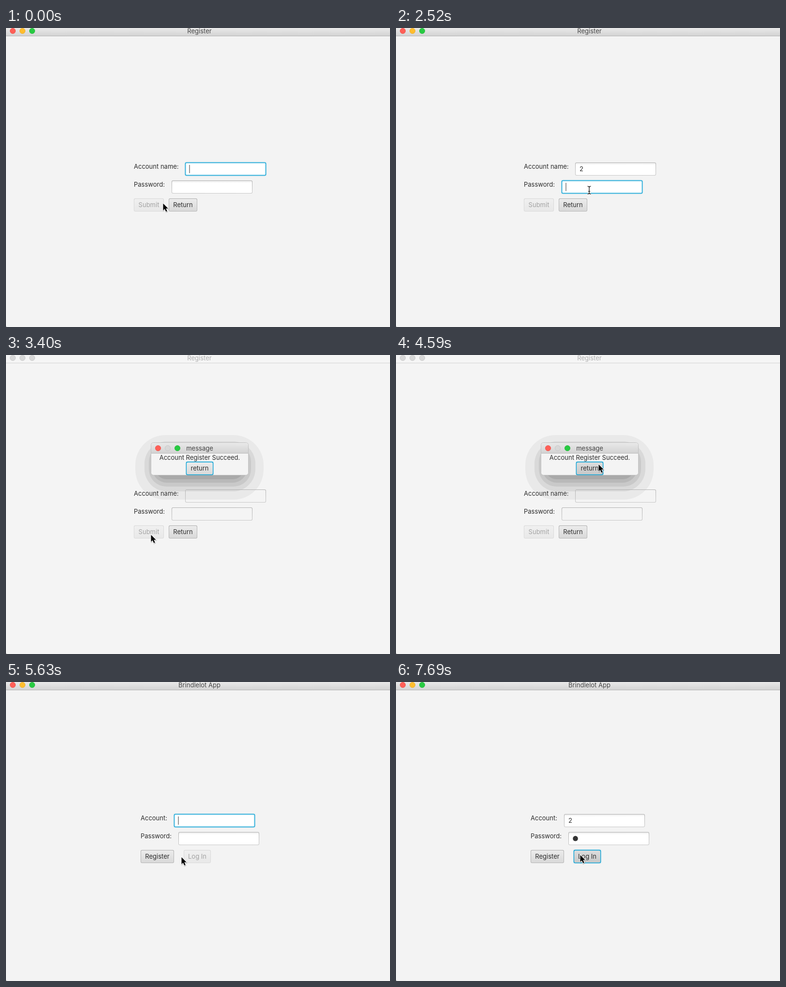
These frames come from a looping animation (793x616 px, 8 s). An HTML page:

```html
<!DOCTYPE html>
<html lang="en">
<head>
<meta charset="utf-8">
<title>Register and log in</title>
<style>
  html, body { margin: 0; height: 100%; overflow: hidden; background: #f3f3f3; }
  svg { display: block; width: 100%; height: 100%; }
  text { font: 13px Inter, sans-serif; white-space: pre; }
  .mid { text-anchor: middle; }
  .shadow { mix-blend-mode: darken; }
</style>
</head>
<body>
<svg viewBox="0 0 793 616">
  <defs>
    <linearGradient id="bar" x2="0" y2="1"><stop stop-color="#e9e9e9"/><stop offset="1" stop-color="#d2d2d2"/></linearGradient>
    <linearGradient id="up" x2="0" y2="1"><stop stop-color="#ebebeb"/><stop offset="1" stop-color="#d9d9d9"/></linearGradient>
    <linearGradient id="hover" x2="0" y2="1"><stop stop-color="#f3f3f3"/><stop offset="1" stop-color="#e2e2e2"/></linearGradient>
    <linearGradient id="down" x2="0" y2="1"><stop stop-color="#dcdcdc"/><stop offset="1" stop-color="#c8c8c8"/></linearGradient>
    <linearGradient id="inset" x2="0" y2="1"><stop stop-color="#ececec"/><stop offset=".18" stop-color="#fff"/></linearGradient>
    <linearGradient id="edge" x2="0" y2="1"><stop stop-color="#b2b2b2"/><stop offset="1" stop-color="#c8c8c8"/></linearGradient>
  </defs>
  <g id="stage"></g>
</svg>
<script>
const LOOP = 8000, BLUE = '#039ed3', FAINT = '#039ed322', INK = '#2c2c2c';
const stage = document.getElementById('stage');

// Each step changes some of the state at its time in ms.
const steps = [
  [0, { scene: 'register', x: 324.5, y: 361.5, beam: false, name: '', pass: false, focus: 'name', dialog: false, hot: '', pressed: false }],
  [440, { x: 372, y: 362, hot: 'back' }],
  [590, { x: 426, y: 352, hot: '' }],
  [740, { x: 420, y: 305 }],
  [890, { x: 414, y: 292, beam: true }],
  [1490, { name: '2' }],
  [1640, { x: 412, y: 300 }],
  [1790, { x: 405, y: 322 }],
  [1930, { x: 400, y: 336 }],
  [2080, { x: 399, y: 338 }],
  [2220, { focus: 'pass' }],
  [2520, { y: 334 }],
  [2660, { pass: true }],
  [2810, { x: 370, y: 352, beam: false, hot: 'back' }],
  [2960, { x: 312, y: 375, hot: 'go' }],
  [3110, { x: 299.5, y: 370.5, focus: 'go', pressed: true }],
  [3250, { dialog: true, name: '', pass: false, focus: 'back', hot: '', pressed: false }],
  [3700, { x: 326, y: 338 }],
  [3850, { x: 398, y: 250 }],
  [4000, { x: 418.5, y: 225.5, hot: 'ok' }],
  [4590, { pressed: true }],
  [4740, { dialog: false, hot: '', pressed: false }],
  [4890, { x: 386, y: 310 }],
  [5040, { x: 362.5, y: 361, hot: 'back' }],
  [5330, { pressed: true }],
  [5480, { scene: 'login', focus: 'name', hot: '', pressed: false }],
  [5780, { x: 367, y: 338 }],
  [5930, { x: 374, y: 305 }],
  [6080, { x: 378, y: 289, beam: true }],
  [6370, { name: '2' }],
  [6520, { x: 376, y: 306 }],
  [6660, { x: 372, y: 328 }],
  [6810, { x: 371, y: 331.5, focus: 'pass' }],
  [6960, { pass: true }],
  [7100, { y: 336 }],
  [7250, { x: 376, y: 346, beam: false }],
  [7400, { x: 380.5, y: 354, hot: 'go' }],
  [7540, { y: 356.5 }],
  [7690, { focus: 'go', pressed: true }],
];

const rect = (x, y, w, h, r, fill, more = '') =>
  `<rect x="${x}" y="${y}" width="${w}" height="${h}" rx="${r}" fill="${fill}" ${more}/>`;
const text = (x, y, s, fill = INK, cls = '') =>
  `<text x="${x}" y="${y}" fill="${fill}" class="${cls}">${s}</text>`;
const light = (x, y, color, edge) =>
  `<circle cx="${x}" cy="${y}" r="5.6" fill="${color}" stroke="${edge}" stroke-width=".8"/>`;
const red = (x, y) => light(x, y, '#ff5f57', '#ee5048');
const green = (x, y) => light(x, y, '#28ca42', '#22b83a');
const grey = (x, y) => light(x, y, '#d8d8d8', '#c6c6c6');

function field(x, y, { value = '', dot = false, focus, flat }) {
  const caret = x + (dot ? 20.5 : value ? 18 : 8.5);
  return (focus
      ? rect(x - .2, y - .2, 167.4, 27.4, 3, BLUE) + rect(x + 1, y + 1, 165, 25, 2, '#fff') +
        rect(x - 1.4, y - 1.4, 169.8, 29.8, 4, FAINT) + rect(x + 3, y + 3, 161, 21, 1, '#fff')
      : rect(x, y, 167, 27, 3, 'url(#edge)') + rect(x + 1, y + 1, 165, 25, 2, flat ? '#f4f4f4' : 'url(#inset)')) +
    (value && text(x + 9, y + 18, value)) +
    (dot ? `<circle cx="${x + 14.5}" cy="${y + 13.4}" r="5.3" fill="#333"/>` : '') +
    (focus ? rect(caret, y + 5, 1, 17, 0, '#333') : '');
}

function button(x, y, w, label, { focus, hot, pressed, disabled }) {
  const face = !hot ? 'up' : pressed ? 'down' : 'hover';
  return `<g opacity="${disabled ? .4 : 1}">` +
    (focus
      ? rect(x - 1.4, y - 1.4, w + 2.8, 29.8, 4, FAINT) + rect(x - .2, y - .2, w + .4, 27.4, 3, BLUE)
      : rect(x, y, w, 27, 3, '#b4b4b4')) +
    rect(x + 1.2, y + 1.2, w - 2.4, 24.6, 2, hot && pressed ? '#e4e4e4' : '#f7f7f7') +
    rect(x + 1.2, y + 2, w - 2.4, 23.8, 2, `url(#${face})`) +
    text(x + w / 2, y + 18, label, INK, 'mid') + '</g>';
}

function windowFrame(title, active) {
  return rect(0, 0, 793, 616, 0, active ? '#f3f3f3' : '#f4f4f4') +
    rect(0, 0, 793, 17, 0, active ? 'url(#bar)' : '#f5f5f5') +
    rect(0, 16, 793, 1, 0, active ? '#b4b4b4' : '#d4d4d4') +
    (active ? red(14, 6) + light(34, 6, '#ffbd2e', '#e9ab28') + green(54, 6)
            : grey(14, 6) + grey(34, 6) + grey(54, 6)) +
    text(399.5, 11, title, active ? '#454545' : '#b0b0b0', 'mid') +
    '<path d="M0 613.5V616H2.5Q.5 615.5 0 613.5" fill="#aaa"/>';
}

function dialog(look) {
  const bands = [
    [267, 165, 265, 133, 62, '#e9e9e9'], [286, 178, 229, 103, 46, '#d9d9d9'],
    [295, 184, 211, 87, 36, '#c9c9c9'], [302, 190, 196, 73, 30, '#b9b9b9'],
    [308, 196, 184, 60, 24, '#a9a9a9'],
  ];
  return `<g class="shadow">${bands.map(b => rect(...b)).join('')}</g>` +
    rect(299.5, 180.5, 201, 67, 5, '#f4f4f4', 'stroke="#c2c2c2"') +
    '<path d="M300 203v-17a5 5 0 0 1 5-5h190a5 5 0 0 1 5 5v17z" fill="url(#bar)"/>' +
    rect(300, 202, 200, 1, 0, '#bcbcbc') +
    red(314, 192) + grey(334, 192) + green(354, 192) +
    text(400, 197, 'message', '#454545', 'mid') +
    text(400, 216, 'Account Register Succeed.', INK, 'mid') +
    button(372, 220, 56, 'return', look);
}

function pointer({ x, y, beam }) {
  const bar = 'M-3.5-8Q-.5-8 0-6Q.5-8 3.5-8M0-6V6M-3.5 8Q-.5 8 0 6Q.5 8 3.5 8M-2 2.5H2';
  const arrow = 'M0 0V14.2L3.3 11.2 5.7 16.8 8.2 15.7 5.8 10.2H10.2Z';
  return `<g transform="translate(${x} ${y})" stroke-linejoin="round">` + (beam
    ? `<path d="${bar}" fill="none" stroke="#fff" stroke-width="3"/><path d="${bar}" fill="none" stroke="#000" stroke-width="1.2"/>`
    : `<path d="${arrow}" stroke="#0002" stroke-width="3" transform="translate(.5 1)"/><path d="${arrow}" stroke="#fff" stroke-width="2" paint-order="stroke"/>`) + '</g>';
}

function draw(s) {
  const flat = s.dialog;
  const look = id => ({ focus: !flat && s.focus === id, hot: s.hot === id, pressed: s.pressed, flat });
  const name = { ...look('name'), value: s.name };
  const pass = { ...look('pass'), dot: s.pass };
  const go = { ...look('go'), disabled: !s.name || !s.pass };
  const view = s.scene === 'register'
    ? windowFrame('Register', !flat) +
      text(264, 290, 'Account name:') + field(370, 277, name) +
      text(264, 327, 'Password:') + field(342, 314, pass) +
      button(264, 351, 62, 'Submit', go) + button(336, 351, 59, 'Return', look('back'))
    : windowFrame('Brindlelot App', true) +
      text(278, 285, 'Account:') + field(347, 272, name) +
      text(278, 322, 'Password:') + field(356, 309, pass) +
      button(278, 346, 69, 'Register', look('back')) + button(367, 346, 56, 'Log In', go);
  const popup = flat ? dialog({ focus: true, hot: s.hot === 'ok', pressed: s.pressed }) : '';
  stage.innerHTML = view + popup + pointer(s);
}

let shown = -1;
function tick() {
  const t = performance.now() % LOOP;
  const past = steps.filter(([at]) => at <= t);
  if (past.length !== shown) {
    shown = past.length;
    draw(Object.assign({}, ...past.map(([, change]) => change)));
  }
  requestAnimationFrame(tick);
}
tick();
</script>
</body>
</html>
```
